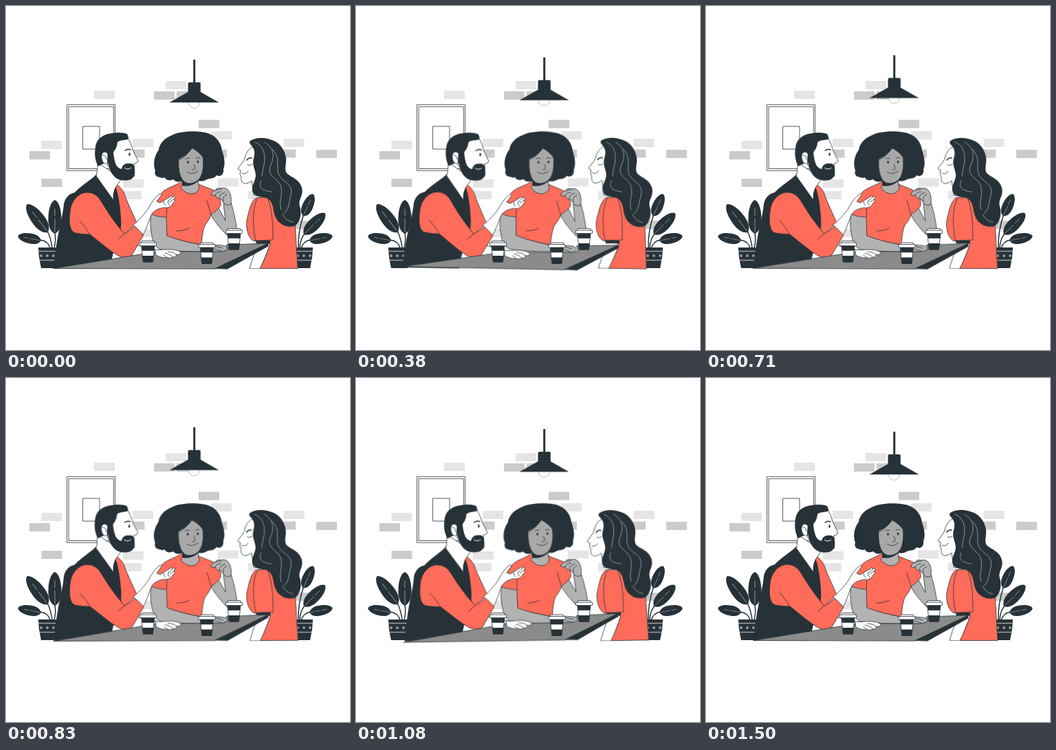
Animation of 500x500 px, one loop 1.54 s. Source, as an HTML page:

```html
<!DOCTYPE html>
<html lang="en">
<head>
<meta charset="utf-8">
<title>Coffee break</title>
<style>
  html, body { margin: 0; width: 100%; height: 100%; overflow: hidden; background: #fff; }
  svg { display: block; width: 100vw; height: 100vh; }
  .dark { fill: #263238; }
  .red { fill: #ff6c59; }
  .white { fill: #fff; }
  .skin { fill: #b2b2b2; }
  .face { fill: #a8a8a8; }
  .pale { fill: #e5e5e5; }
  .mid { fill: #cbcbcb; }
  .line { fill: none; }
  .ink { stroke: #263238; stroke-width: .8; stroke-linecap: round; stroke-linejoin: round; }
  .bold { stroke-width: 1.5; }
  .vein { fill: none; stroke: #b9bdbf; stroke-width: .7; stroke-linecap: round; }
  .band { fill: none; stroke: #9a9fa2; stroke-width: 1.7; }
  .lamp { animation: float 1540ms cubic-bezier(.37, 0, .63, 1) infinite; }
  .man, .woman, .girl, .table { animation: sway 1540ms infinite; }
  .man { transform-origin: 157px 283px; }
  .woman { transform-origin: 262px 270px; }
  .girl { transform-origin: 383px 287px; }
  .table { transform-origin: 225px 363px; }
  /* 1500 ms of motion, then a short rest */
  @keyframes float {
    0%, 97.4%, 100% { transform: none; }
    48.7% { transform: translateY(-6.5px); }
  }
  @keyframes sway {
    0% { transform: rotate(0deg); animation-timing-function: cubic-bezier(.61, 1, .88, 1); }
    24.35% { transform: rotate(1deg); animation-timing-function: cubic-bezier(.37, 0, .63, 1); }
    73.05% { transform: rotate(-1deg); animation-timing-function: cubic-bezier(.12, 0, .39, 0); }
    97.4%, 100% { transform: rotate(0deg); }
  }
</style>
</head>
<body>
<svg viewBox="0 0 500 500">
  <defs>
    <path id="brick" d="M0 0h30v12H0z"/>
    <g id="leaf">
      <path class="dark" d="M0 0C-8-4-10-14-9.500-24C-9-38-5-47 0-49C5-47 9-38 9.500-24C10-14 8-4 0 0Z"/>
      <path class="vein" d="M0-3V-22M0-26V-36"/>
    </g>
    <g id="pot">
      <path class="dark" d="M0 0H32L31 14L28 30H4L1 14Z"/>
      <path class="band" d="M0 5.500H32M2 18.500H30"/>
      <g fill="#9a9fa2"><circle cx="4" cy="12" r="1.900"/><circle cx="13" cy="12" r="1.900"/><circle cx="22" cy="12" r="1.900"/></g>
    </g>
    <g id="cup">
      <path class="white ink" d="M-9.500 6H9.500L7 30.500H-7Z"/>
      <path class="dark" d="M-9.500 7H9.500L8.800 14.300H-8.800ZM-8.300 21.500H8.300L7 31H-7Z"/>
      <path class="white ink" d="M-10 2.500L-9 0H9L10 2.500H11.500Q12 2.500 12 3V6.500Q12 7 11.500 7H-11.500Q-12 7-12 6.500V3Q-12 2.500-11.500 2.500ZM-10 2.500H10"/>
    </g>
  </defs>

  <g class="pale">
    <use href="#brick" x="128" y="123"/><use href="#brick" x="232" y="109"/>
    <use href="#brick" x="51.500" y="196"/><use href="#brick" x="184" y="193"/>
    <use href="#brick" x="298" y="182"/><use href="#brick" x="403.500" y="193"/>
    <use href="#brick" x="170" y="252"/><use href="#brick" x="308" y="250.500"/>
    <use href="#brick" x="167" y="269"/><use href="#brick" x="352" y="269"/>
    <use href="#brick" x="182" y="324"/>
  </g>
  <g class="mid">
    <use href="#brick" x="215" y="124"/><use href="#brick" x="248" y="124"/>
    <use href="#brick" x="280" y="165.500"/><use href="#brick" x="34" y="211"/>
    <use href="#brick" x="51.500" y="251"/><use href="#brick" x="171.500" y="208.500"/>
    <use href="#brick" x="291" y="208.500"/><use href="#brick" x="391" y="208.500"/>
    <use href="#brick" x="451" y="209"/><use href="#brick" x="410" y="312"/>
  </g>
  <path class="white ink" d="M89 143.300H158.500V239.300H89ZM91.500 146.300H156.300V236.500H91.500ZM112 175H136V208H112Z"/>

  <g class="plant">
    <path class="line ink bold" d="M60 327Q66 339 67 352M71 330Q73 340 70 352M50 340Q62 342 64 352"/>
    <use href="#leaf" transform="translate(61 329) rotate(-37) scale(1.020 1.040)"/>
    <use href="#leaf" transform="translate(71 331)"/>
    <use href="#leaf" transform="translate(51 341) rotate(-79) scale(.78 .7)"/>
    <use href="#pot" x="47" y="351"/>
  </g>
  <g class="plant">
    <path class="line ink bold" d="M432 305Q424 330 425 352M434 331Q427 340 427 352M442 340Q432 342 429 352"/>
    <use href="#leaf" transform="translate(432 305.500) rotate(24) scale(.82 .72)"/>
    <use href="#leaf" transform="translate(433 332) rotate(45) scale(.92 .89)"/>
    <use href="#leaf" transform="translate(441 341) rotate(79) scale(.78 .7)"/>
    <use href="#pot" transform="translate(446 351) scale(-1 1)"/>
  </g>

  <g class="lamp">
    <circle cx="273.500" cy="140" r="8.300" fill="#fff" stroke="#9a9fa2" stroke-width=".7"/>
    <path class="dark" d="M272.200 78H275.200V111H281Q282.800 111 282.800 113V125L309.500 140.300H237.500L264.500 125V113Q264.500 111 266.500 111H272.200Z"/>
  </g>

  <g class="woman">
    <path class="dark" d="M224 249C218 249 215 244 217 239C213 229 216 217 222 209C223 199 232 191 243 187C256 181 284 181 296 186C308 191 313 201 314 210C319 224 318 232 316 237C317 244 313 249 306 246C302 252 296 250 292 252C286 256 280 254 278 254H256C251 257 245 255 243 252C237 255 231 252 231 249Q228 251 224 249Z"/>
    <path class="skin ink" d="M211 300C209 315 210 326 212 333C213 343 217 351 225 354C245 357 280 357 306 357C314 358 321 356 322 353Q322 349 315 348L302 347L283 347C263 343 247 339 234 333L235 303Z"/>
    <path class="line ink" d="M304 349L315 352M303 353L313 356"/>
    <path class="skin ink" d="M295 298C301 311 311 323 320 332C326 339 336 336 336 328C334 312 331 298 327 286L316 287L319 312L308 292Z"/>
    <path class="red ink" d="M256 255C246 261 235 264 229 269C221 277 213 292 210 302C218 306 227 307 233 307L234 334C250 340 267 344 284 347C285 336 286 326 289 319C294 312 297 308 298 303C303 300 308 296 312 290C313 280 308 270 300 267L280 259Z"/>
    <path class="skin ink" d="M256 253Q258 262 254 264Q261 273 270 273Q278 272 281 265Q279 261 280 250Z"/>
    <path class="dark" d="M256 251L280 248L279 255Q268 264 256 261Z"/>
    <path class="face ink" d="M251 222C250 239 253 251 260 256C267 260 276 257 281 251C286 245 288 232 286 218L271 205Q266 216 251 222Z"/>
    <path class="dark" d="M247 225C255 220 262 213 267 206C274 208 282 213 287 222L288 203H248Z"/>
    <path class="line ink" d="M252 223Q262 220 267 208M261 222Q264 220 267 221.500M276 221Q279 219 282 221M273 230Q277 237 273 238H271M263 241Q270 247 279 240"/>
    <ellipse class="dark" cx="264.500" cy="227" rx="1.300" ry="2"/>
    <ellipse class="dark" cx="279" cy="226.500" rx="1.300" ry="2"/>
    <path class="line ink" d="M233 307L234 290M248 327Q259 327 266 323M298 303L292 283"/>
    <path class="skin ink" d="M298 274C298 270 302 269 304 268C306 264 311 264 313 265C318 263 323 266 325 271Q328 276 327 288Q322 291 317 287L312 280Q306 281 304 275Q300 277 298 274Z"/>
    <path class="line ink" d="M304 275Q306 270 312 270M310 279Q310 273 318 271M316 284Q314 276 321 274M304 268Q308 266 313 266"/>
  </g>

  <g class="girl">
    <path class="white ink" d="M354 381.500Q358 367 363 355L385 344L370 381.500Z"/>
    <path class="red ink" d="M363 279C355 286 354 296 351 307C348 318 350 330 355 337Q358 342 363 342L384 345Q377 367 369 381.500H424L420 312L385 280Z"/>
    <path class="white ink" d="M361 203C353 207 348 214 347 222C344 228 340 232 337 236Q338 239 341 239L340 244L342 248C341 255 344 259 349 258Q354 257 357 254L360 275H374L372 204Z"/>
    <path class="line ink" d="M351 231Q354 233 358 230M343 243Q348 246 352 240"/>
    <path class="line ink bold" d="M350 224Q353 220 357 221"/>
    <path class="red ink" d="M366 279C358 291 358 321 363 341L388 340C388 316 387 296 380 278Z"/>
    <path class="dark" d="M363 341L384 341V345L364 345.500Z"/>
    <path class="dark" d="M355 196C364 190 378 191 387 195C399 199 406 211 407 221C408 229 404 237 408 243C414 249 426 251 430 264C433 276 424 281 427 291C431 303 426 317 419 320C408 323 395 317 391 305C388 297 389 287 382 281C376 276 364 280 359 271C355 263 362 256 363 247C363 238 357 232 360 221C363 211 360 206 355 201Q353 198 355 196Z"/>
    <path class="vein" d="M362 198C374 203 379 216 374 235Q373 239 372 247M376 198C391 207 390 221 384 233C379 249 397 250 400 264C402 279 396 283 400 296M387 208C400 221 392 234 396 244C402 258 418 256 414 275C411 285 412 295 404 302M371 254C365 266 376 269 386 270M402 303Q408 313 417 314"/>
  </g>

  <g class="man">
    <path class="red ink" d="M158 258C167 262 172 270 174 279L190 315L171 333L160 310Z"/>
    <path class="white ink" d="M157 348H192Q210 352 221 355L195 369H151Z"/>
    <path class="dark" d="M132 244C124 253 110 260 100 271C92 273 86 278 84 288C83 301 80 311 77 326C73 346 71 363 69 381.500H152C153 366 158 351 163 340C167 329 168 317 167 307C166 290 163 270 157 257Z"/>
    <path class="white ink" d="M133 228Q133 242 131 247L156 282Q155 272 159 264L168 251Z"/>
    <path class="white ink" d="M147 198L177 191Q182 200 185 211L192 225Q192 228 186 229L187 247L164 252L148 232Z"/>
    <path class="dark" d="M134 233C128 222 129 212 130 205C132 191 144 186 154 185C163 183 171 184 176 186Q179 191 177 194C170 195 165 195 162 198C161 208 157 210 156 213Q157 224 160 231Q163 236 168 237C169 231 174 228 179 229C185 228 187 232 187 237C188 246 185 252 178 253C169 255 160 252 155 245C151 240 149 232 148 226Z"/>
    <path class="white ink" d="M148 215C146 211 140 211 139 217C138 224 142 231 147 229Z"/>
    <path class="line ink" d="M141 217Q145 216 146 223"/>
    <path class="line ink bold" d="M173 210Q177 207 181 209"/>
    <ellipse class="dark" cx="179.500" cy="215.500" rx="1.200" ry="2.500"/>
    <path fill="none" stroke="#fff" d="M172 235Q177 239 182 235"/>
    <path class="white ink" d="M185 318C195 310 203 300 207 294C211 286 216 279 222 274C226 271 227 273 225 276L219 284L224 286L239 277Q242 274 242 278L244 276Q247 277 244 281Q247 283 243 286C241 291 236 294 230 293C221 294 214 298 211 304C207 314 204 325 199 333Z"/>
    <path class="line ink" d="M242 278L236 283M244 281L238 285M229 284Q229 288 232 290M236 283Q234 288 238 289"/>
    <path class="red ink" d="M120 271C106 270 94 283 93 300C91 315 93 328 101 330Q113 332 122 332C134 341 148 354 163 363Q177 369 183 362L200 333Q194 326 187 320Q180 327 172 331C158 315 148 300 139 285Q132 272 120 271Z"/>
    <path class="line ink" d="M107 312Q113 318 122 332M163 339L172 331"/>
  </g>

  <g class="table">
    <path class="ink" fill="#8b8b8b" d="M69 381.500L195 361L222 357Q260 357 302 357Q318 358 323 353L320 347L381 345L304 382Z"/>
    <path class="dark ink" d="M304 381.500L381 345V349L322 382Z"/>
  </g>

  <g class="man">
    <path class="white ink" d="M217 354Q224 355 230 354Q241 353 248 355Q255 357 254 360Q250 362 247 361Q249 365 243 365Q239 367 234 366Q224 366 218 362Z"/>
    <path class="line ink" d="M235 357Q243 357 247 361M231 359Q239 361 243 365M229 362L235 366"/>
  </g>

  <use href="#cup" x="206.500" y="341.500"/>
  <use href="#cup" x="292" y="344"/>
  <use href="#cup" x="331.500" y="323.500"/>
</svg>
</body>
</html>
```
